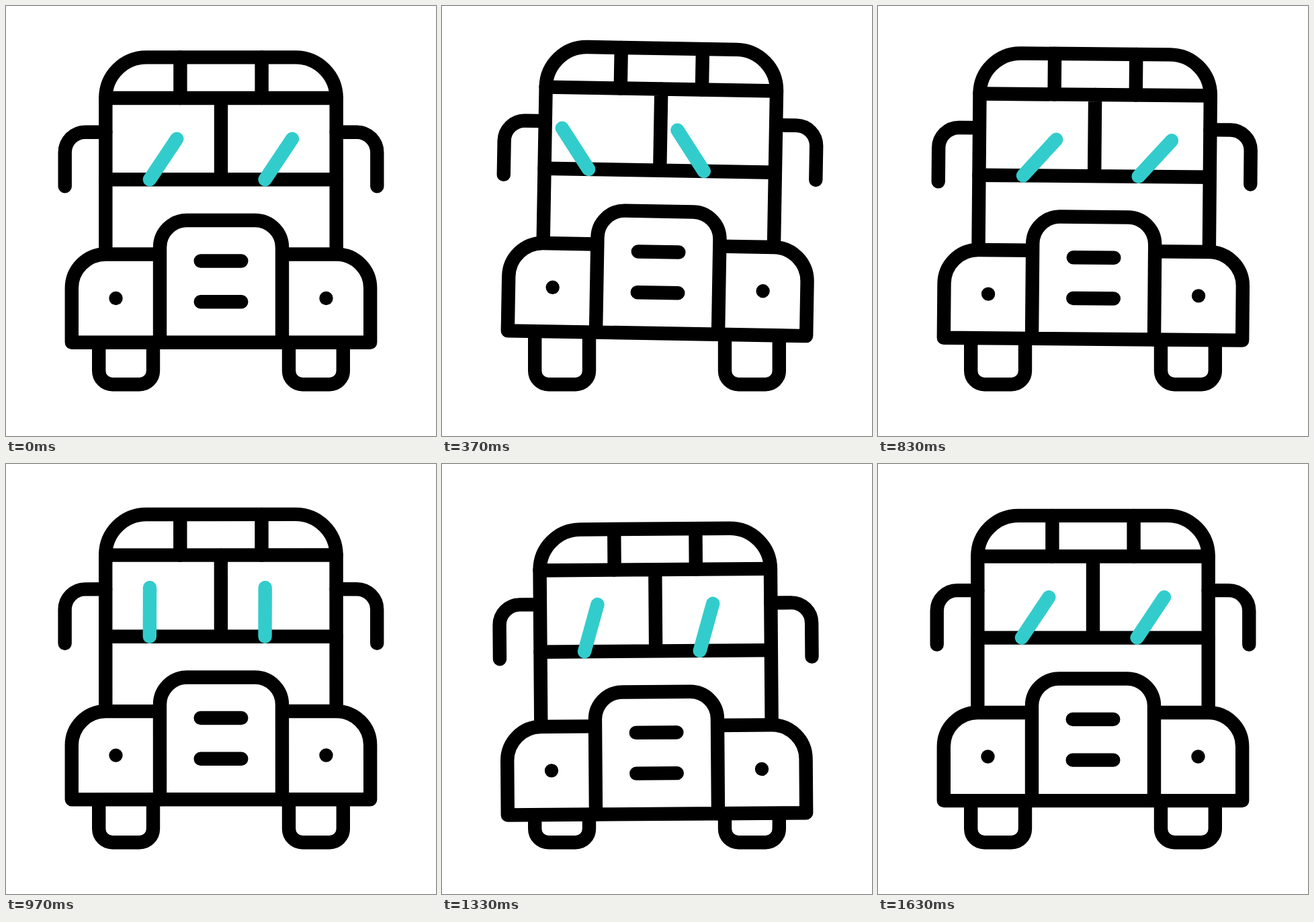
These frames come from a looping animation (640x640 px, 1670 ms). An HTML page:

```html
<!DOCTYPE html>
<html lang="en">
<head>
<meta charset="utf-8">
<title>Bus</title>
<style>
  html, body { margin: 0; width: 100%; height: 100%; overflow: hidden; background: #fff; }
  svg { display: block; width: 100%; height: 100%; }
</style>
</head>
<body>
<svg viewBox="0 0 640 640" fill="none" stroke="#000" stroke-width="20.4" stroke-linecap="round" stroke-linejoin="round">
  <defs>
    <path id="wheel" d="M138.2 480V543A20.2 20.2 0 0 0 158.4 563.2H198.8A20.2 20.2 0 0 0 219 543V480"/>
    <g id="side">
      <path d="M148.3 187.7H118A30.3 30.3 0 0 0 87.7 218V268.4"/>
      <path d="M259.4 76.5V137"/>
      <path d="M229 369.5H148.3A50.5 50.5 0 0 0 97.8 420V500.7H229" fill="#fff"/>
      <circle cx="163.5" cy="435" r="10.2" fill="#000" stroke="none"/>
    </g>
  </defs>
  <use href="#wheel"/>
  <use href="#wheel" transform="matrix(-1 0 0 1 640 0)"/>
  <g id="body">
    <path d="M148.3 369.5V137A60.6 60.6 0 0 1 208.9 76.4H431.1A60.6 60.6 0 0 1 491.7 137V369.5" fill="#fff"/>
    <path d="M148.3 137H491.7M148.3 258.2H491.7M320 137V258.2"/>
    <use href="#side"/>
    <use href="#side" transform="matrix(-1 0 0 1 640 0)"/>
    <path d="M229 500.7V359.4A40.4 40.4 0 0 1 269.4 319H370.6A40.4 40.4 0 0 1 411 359.4V500.7Z" fill="#fff"/>
    <path d="M289.7 379.5H350.3M289.7 440.2H350.3"/>
    <g stroke="#3cc">
      <path class="wiper" d="M213.9 258.2L254.3 197.7"/>
      <path class="wiper" d="M385.6 258.2L426 197.7"/>
    </g>
  </g>
</svg>
<script>
  const LOOP = 1670, FPS = 30, FRAMES = 50;

  // Each track is a list of [frame, value], eased between neighbours.
  const lift = [[0, 0], [5, 5], [11.5, -13.8], [21, 9.5], [25.3, -5.2], [32, 1.3], [38, 21.8], [50, 0]];
  const tilt = [[0, 0], [5, -2.2], [11, 1], [18, -.5], [25, .5], [32.8, -.5], [36.5, 1.65], [40.7, -.6], [47, 0], [50, 0]];
  const wipe = [[0, 0], [10, -70.8], [18.2, 9.5], [24.4, 9.5], [33.3, -72.5], [43.2, 0], [50, 0]];

  function sample(track, frame) {
    const next = track.findIndex(([at]) => at > frame);
    const [start, from] = track[next - 1], [end, to] = track[next];
    const s = (frame - start) / (end - start);
    return from + (to - from) * s * s * (3 - 2 * s);
  }

  const body = document.getElementById('body');
  const wipers = document.querySelectorAll('.wiper');
  const pivots = [213.9, 385.6];

  function draw(now) {
    const time = now % LOOP;
    const frame = Math.min(FRAMES - 1, Math.floor((time + 3.4) * FPS / 1000));
    body.setAttribute('transform', `translate(0 ${sample(lift, frame)}) rotate(${sample(tilt, frame)} 320 500)`);
    wipers.forEach((wiper, i) =>
      wiper.setAttribute('transform', `rotate(${sample(wipe, frame)} ${pivots[i]} 258.2)`));
    requestAnimationFrame(draw);
  }
  draw(0);
</script>
</body>
</html>
```
